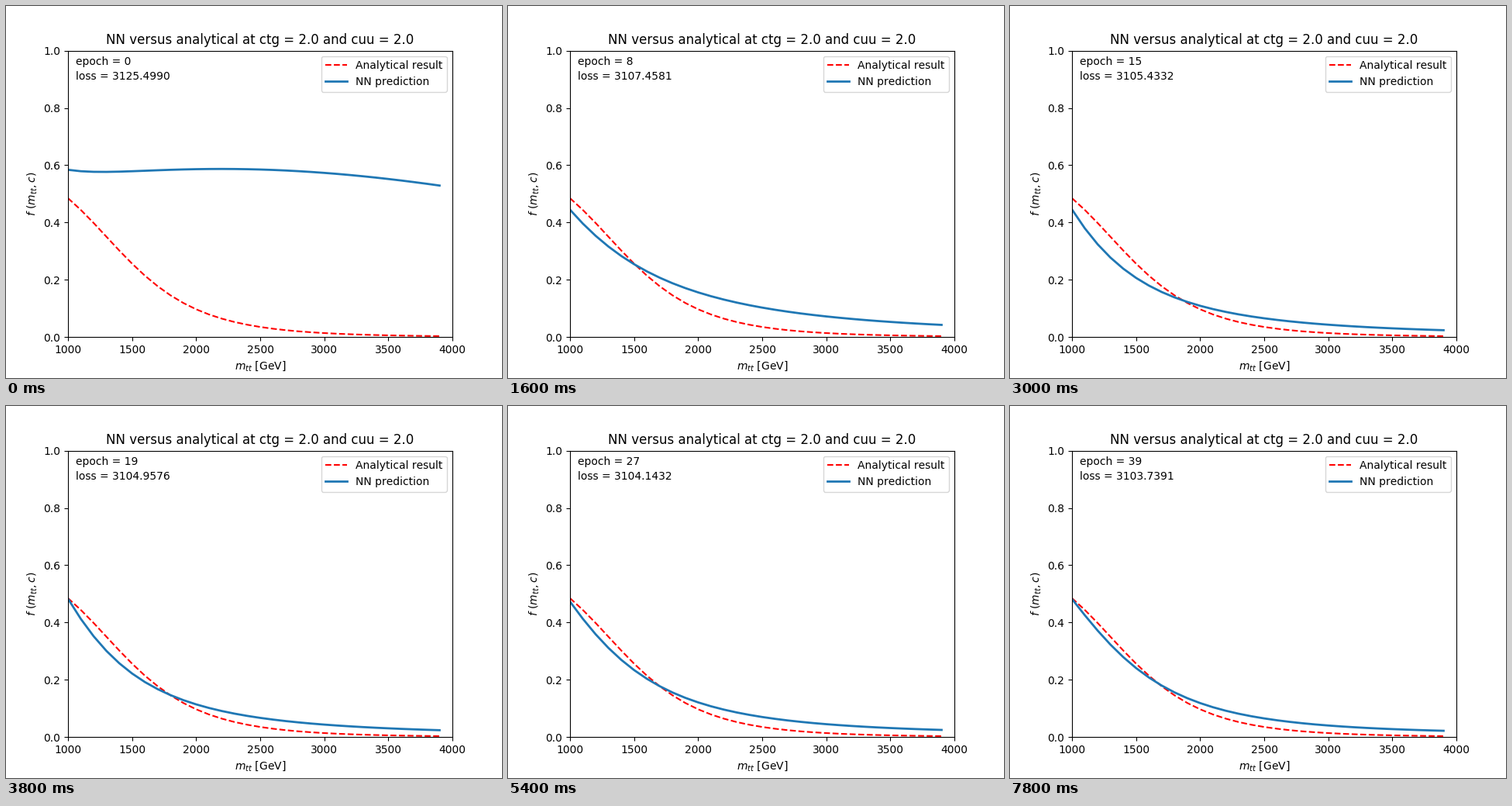
A matplotlib script for the animation above (8000 ms loop, 640x480 px).

```python
import numpy as np
import matplotlib.pyplot as plt
from matplotlib.animation import FuncAnimation

plt.rcParams["text.kerning_factor"] = 6

EPOCHS = 40
LOSS_FLOOR = 3103.3
ANCHORS = [1.0, 1.5, 2.2, 3.9]  # masses in TeV where the stages are given

# epoch, loss, prediction at the anchor masses
STAGES = np.array([
    [0, 3125.4990, .584, .579, .587, .529],
    [5, 3110.0354, .512, .371, .233, .093],
    [11, 3106.2531, .398, .188, .084, .024],
    [19, 3104.9576, .483, .222, .091, .024],
    [27, 3104.1432, .473, .234, .096, .025],
    [34, 3103.8481, .480, .228, .088, .0215],
    [39, 3103.7391, .482, .241, .092, .022],
])

mass = np.arange(1.0, 3.95, 0.1)


def logit(y):
    return np.log(y / (1 - y))


def analytical(m):
    """1 / (1 + r), with the ratio r a cubic in the squared mass."""
    return 1 / (1 + np.polyval([.0672, .243, .122, .63], m ** 2))


# Each stage is a cubic in log(mass) in logit space; training runs on a log clock.
clock = np.log1p(STAGES[:, 0])
log_loss = np.log(STAGES[:, 1] - LOSS_FLOOR)
coefs = np.polyfit(np.log(ANCHORS), logit(STAGES[:, 2:]).T, 3)


def prediction(epoch):
    cubic = [np.interp(np.log1p(epoch), clock, c) for c in coefs]
    return 1 / (1 + np.exp(-np.polyval(cubic, np.log(mass))))


def loss(epoch):
    return LOSS_FLOOR + np.exp(np.interp(np.log1p(epoch), clock, log_loss))


fig, ax = plt.subplots(figsize=(6.4, 4.8), dpi=100)
ax.plot(1000 * mass, analytical(mass), "r--", label="Analytical result")
line, = ax.plot(1000 * mass, prediction(0), color="C0", lw=2, label="NN prediction")
ax.set(xlim=(1000, 4000), ylim=(0, 1),
       xlabel=r"$m_{tt}$ [GeV]", ylabel=r"$f\ (m_{tt}, c)$",
       title="NN versus analytical at ctg = 2.0 and cuu = 2.0")
ax.legend(loc="upper right")
epoch_text = ax.text(0.02, 0.95, "", transform=ax.transAxes)
loss_text = ax.text(0.02, 0.90, "", transform=ax.transAxes)


def update(epoch):
    line.set_ydata(prediction(epoch))
    epoch_text.set_text(f"epoch = {epoch}")
    loss_text.set_text(f"loss = {loss(epoch):.4f}")
    return line, epoch_text, loss_text


anim = FuncAnimation(fig, update, frames=EPOCHS, interval=200, repeat=True, repeat_delay=0)
plt.show()
```
